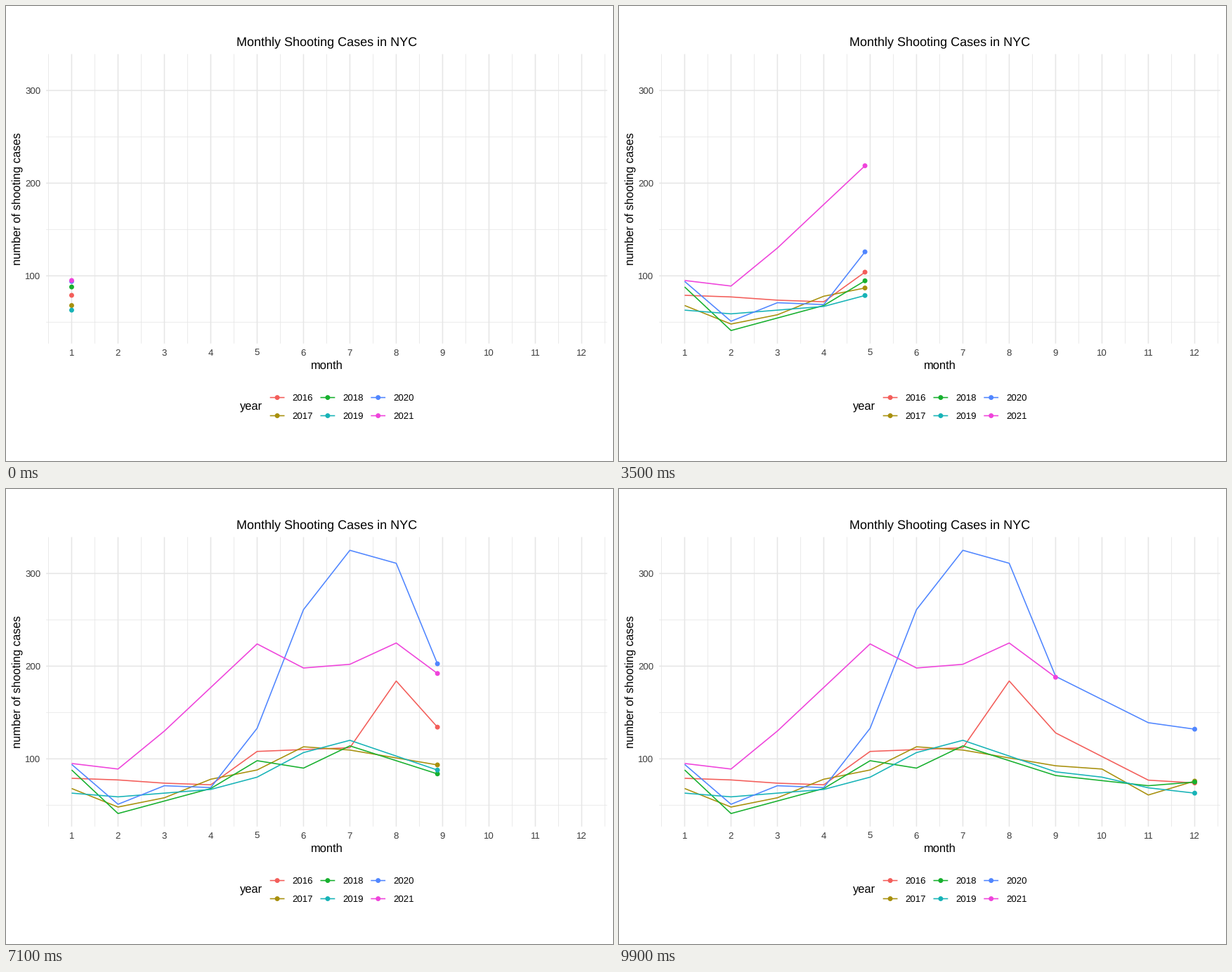
These frames come from a looping animation (864x648 px, 10000 ms). A matplotlib script:

```python
import numpy as np
import matplotlib.pyplot as plt
from matplotlib.animation import FuncAnimation
from matplotlib.patches import Circle

W, H, DPI = 864, 648, 108
FRAMES, INTERVAL = 100, 100
LINE, RADIUS = 1.067, 3.47  # points, pixels
LEFT, RIGHT, TOP, BOTTOM = 57.15, 855.75, 68.5, 480.7
MID = (LEFT + RIGHT) / 2
GRID, TICK = "#E6E6E6", "#3C3C3C"
_ = None

plt.rcParams.update({"font.family": "Liberation Sans", "text.hinting": "none"})

# Key months of each year; the gaps are eased.
SERIES = {
    2016: ("#F35E5A", [79, _, _, 72, 108, _, 112, 184, 128, _, 77, 74]),
    2017: ("#A8900D", [68, 48, _, _, 88, 113, _, _, _, 89, 61, 76]),
    2018: ("#17B02E", [88, 41, _, 68, 98, 90, 114, _, 82, _, 71, 75]),
    2019: ("#17B3B7", [63, 59, _, 67, _, _, 120, _, 86, _, _, 63]),
    2020: ("#5086FF", [94, 51, 71, 69, _, _, 325, 311, 189, _, 139, 132]),
    2021: ("#EF43DB", [95, 89, 130, _, 224, 198, 202, 225, 188]),
}


def fill(keys):
    """Ease along a cosine between the known months."""
    known = [i for i, count in enumerate(keys) if count is not None]
    order = np.arange(len(known))
    pos = np.interp(np.arange(len(keys)), known, order)
    step = np.floor(pos)
    eased = step + (1 - np.cos(np.pi * (pos - step))) / 2
    return np.interp(eased, order, [keys[i] for i in known])


def px(month):
    return 93.45 + 66 * (np.asarray(month) - 1)


def py(count):
    return 384.3 - 1.32 * (np.asarray(count) - 100)


fig = plt.figure(figsize=(W / DPI, H / DPI), dpi=DPI, facecolor="white")
ax = fig.add_axes([0, 0, 1, 1])
ax.set(xlim=(0, W), ylim=(H, 0))
ax.axis("off")


def stroke(x, y, color, width=LINE, z=2):
    return ax.plot(x, y, color=color, lw=width, solid_capstyle="butt",
                   solid_joinstyle="round", snap=False, zorder=z)[0]


def dot(x, y, color):
    return ax.add_patch(Circle((x, y), RADIUS, fc=color, lw=0, zorder=3))


def label(x, y, text, size, color="black", ha="center", rotation=0):
    ax.text(x, y, text, fontsize=size, color=color, ha=ha, va="baseline",
            rotation=rotation, rotation_mode="anchor")


def vline(month, width, z):
    stroke([px(month)] * 2, [TOP, BOTTOM], GRID, width, z)


def hline(count, width, z):
    stroke([LEFT, RIGHT], [py(count)] * 2, GRID, width, z)


def draw_panel():
    for month in np.arange(0.5, 13):
        vline(month, LINE / 2, 0)
    for month in range(1, 13):
        vline(month, LINE, 1)
        label(px(month), 497.6, str(month), 8.8, TICK)
    for count in (100, 200, 300):
        hline(count - 50, LINE / 2, 0)
        hline(count, LINE, 1)
        label(49.6, py(count) + 4.7, str(count), 8.8, TICK, "right")
    label(MID, 56.4, "Monthly Shooting Cases in NYC", 12)
    label(MID, 516.4, "month", 11)
    label(20.2, (TOP + BOTTOM) / 2, "number of shooting cases", 11, rotation=90)


def draw_legend():
    label(332.8, 574.7, "year", 11, ha="left")
    for i, (year, (color, _keys)) in enumerate(SERIES.items()):
        x, y = 386.1 + 71.8 * (i // 2), 557.6 + 25.9 * (i % 2)
        stroke([x - 10.4, x + 10.4], [y, y], color)
        dot(x, y, color)
        label(x + 21.2, y + 4.7, str(year), 8.8, ha="left")


draw_panel()
draw_legend()
tracks = [(fill(keys), stroke([], [], color), dot(0, 0, color))
          for color, keys in SERIES.values()]


def update(frame):
    now = 1 + 11 * frame / (FRAMES - 1)
    for counts, line, head in tracks:
        months = np.arange(1, len(counts) + 1)
        end = min(now, len(counts))
        past = months < end - 1e-9
        x = px(np.append(months[past], end))
        y = py(np.append(counts[past], np.interp(end, months, counts)))
        line.set_data(x, y)
        head.center = x[-1], y[-1]
    return [artist for track in tracks for artist in track[1:]]


anim = FuncAnimation(fig, update, frames=FRAMES, interval=INTERVAL,
                     init_func=lambda: update(0), repeat=True, repeat_delay=0)
plt.show()
```
